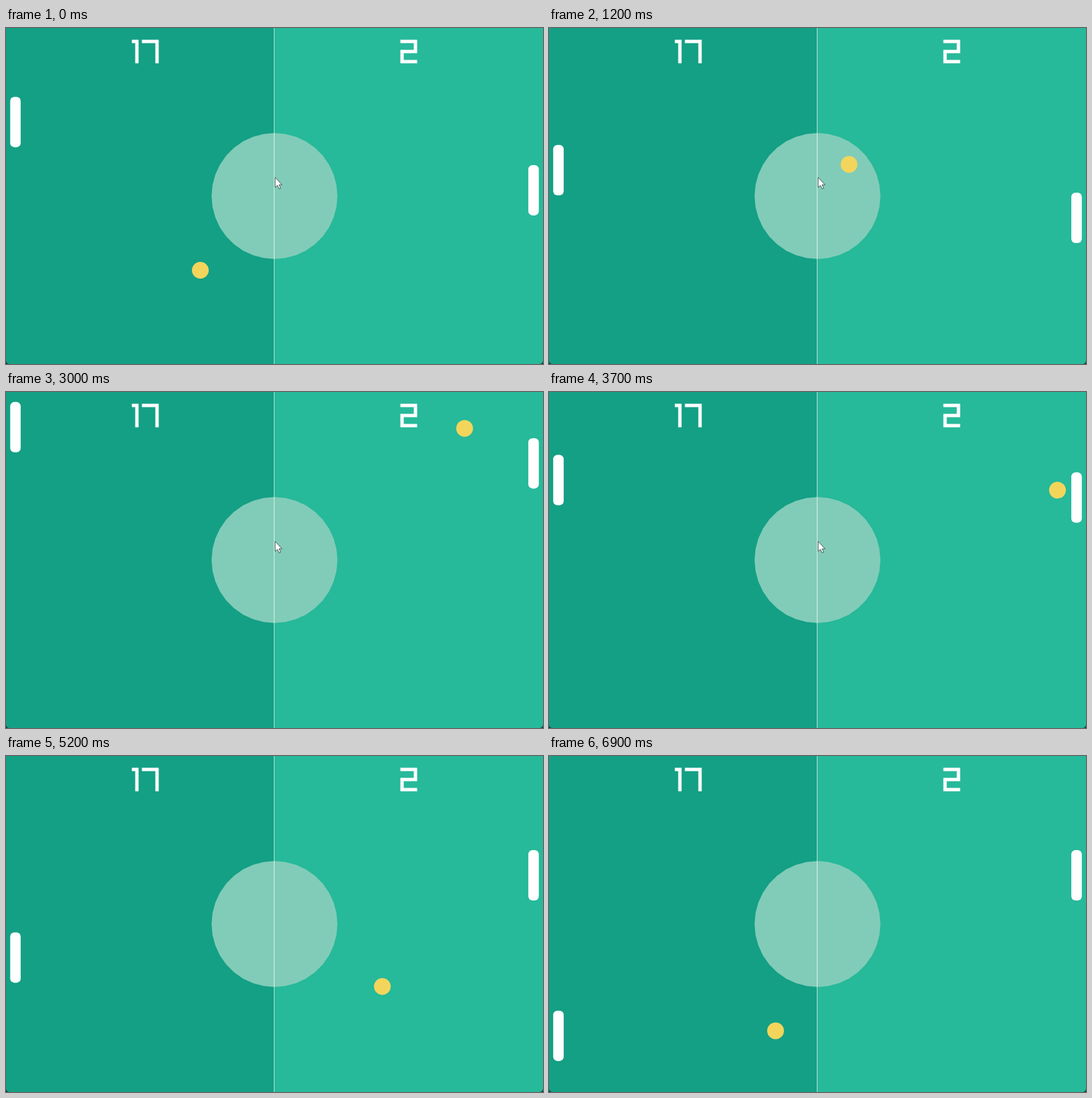
An HTML page for the animation above (7 s loop, 800 px wide and 500 px high).

```html
<!DOCTYPE html>
<html lang="en">
<head>
<meta charset="utf-8">
<title>Paddle game</title>
<style>
  html, body { margin: 0; width: 100%; height: 100%; overflow: hidden; background: #14a085; }
  svg { display: block; width: 800px; height: 500px; }
  .score { fill: none; stroke: #fff; stroke-width: 5; }
  .paddle { fill: #fff; }
</style>
</head>
<body>
<svg viewBox="0 0 800 500">
  <rect width="400" height="500" fill="#14a085"/>
  <rect x="400" width="400" height="500" fill="#26b99a"/>
  <polygon id="disc" fill="#81ccb8"/>
  <rect x="399.3" width=".7" height="500" fill="#fff"/>

  <g class="score" role="img" aria-label="17 to 2">
    <path d="M187.5 20H195V52.5"/>
    <path d="M202.5 20H225V52.5"/>
    <path d="M587.5 20H610V35H590V50H612.5"/>
  </g>

  <circle id="ball" r="12.5" fill="#f3d55b"/>
  <rect id="left" class="paddle" x="6.25" width="15.625" height="75" rx="6.25"/>
  <rect id="right" class="paddle" x="778.125" width="15.625" height="75" rx="6.25"/>

  <path id="cursor" d="M401 222.3V237.2L404.4 234.2L406.9 239.4L409.2 238.3L406.8 233.3H411.2Z"
        fill="#fff" stroke="#3a4a47" stroke-width=".9" stroke-linejoin="round"/>

  <path d="M0 495Q.5 499.5 5 500H0ZM800 495Q799.5 499.5 795 500H800Z" fill="#173f3b"/>
</svg>
<script>
  const LOOP = 7000, STEP = 100, CURSOR_OFF = 5000;
  const $ = id => document.getElementById(id);

  // Each track is a list of [time, value] turning points.
  const tracks = {
    ballX: [[0, 289.5], [3633, 766.3], [LOOP, 324.4]],
    ballY: [[0, 360.5], [2667, 10.5], [6301, 487.5], [LOOP, 395.8]],
    left: [[0, 102.4], [918, 205.7], [2746, 0], [2868, 0], [6568, 416.3], [LOOP, 367.7]],
    right: [[0, 203.9], [400, 203.9], [764, 245], [1200, 245], [2767, 68.7],
            [3250, 68.7], [3881, 140], [LOOP, 140]]
  };

  function at(track, t) {
    const i = track.findIndex(([time]) => time > t);
    const [t0, v0] = track[i - 1], [t1, v1] = track[i];
    return v0 + (v1 - v0) * (t - t0) / (t1 - t0);
  }

  function draw(t) {
    $('ball').setAttribute('cx', at(tracks.ballX, t));
    $('ball').setAttribute('cy', at(tracks.ballY, t));
    $('left').setAttribute('y', at(tracks.left, t));
    $('right').setAttribute('y', at(tracks.right, t));
    $('cursor').style.visibility = t < CURSOR_OFF ? 'visible' : 'hidden';
  }

  // The centre disc is a 36-sided polygon.
  $('disc').setAttribute('points', Array.from({ length: 36 }, (_, i) => {
    const a = i * Math.PI / 18;
    return [400 + 93.75 * Math.cos(a), 250 + 93.75 * Math.sin(a)];
  }).join(' '));

  const start = performance.now();
  function tick() {
    // Ten poses a second, with a small lead against timer jitter.
    const pose = Math.floor((performance.now() - start) / STEP + .1);
    draw(pose * STEP % LOOP);
    requestAnimationFrame(tick);
  }
  tick();
</script>
</body>
</html>
```
